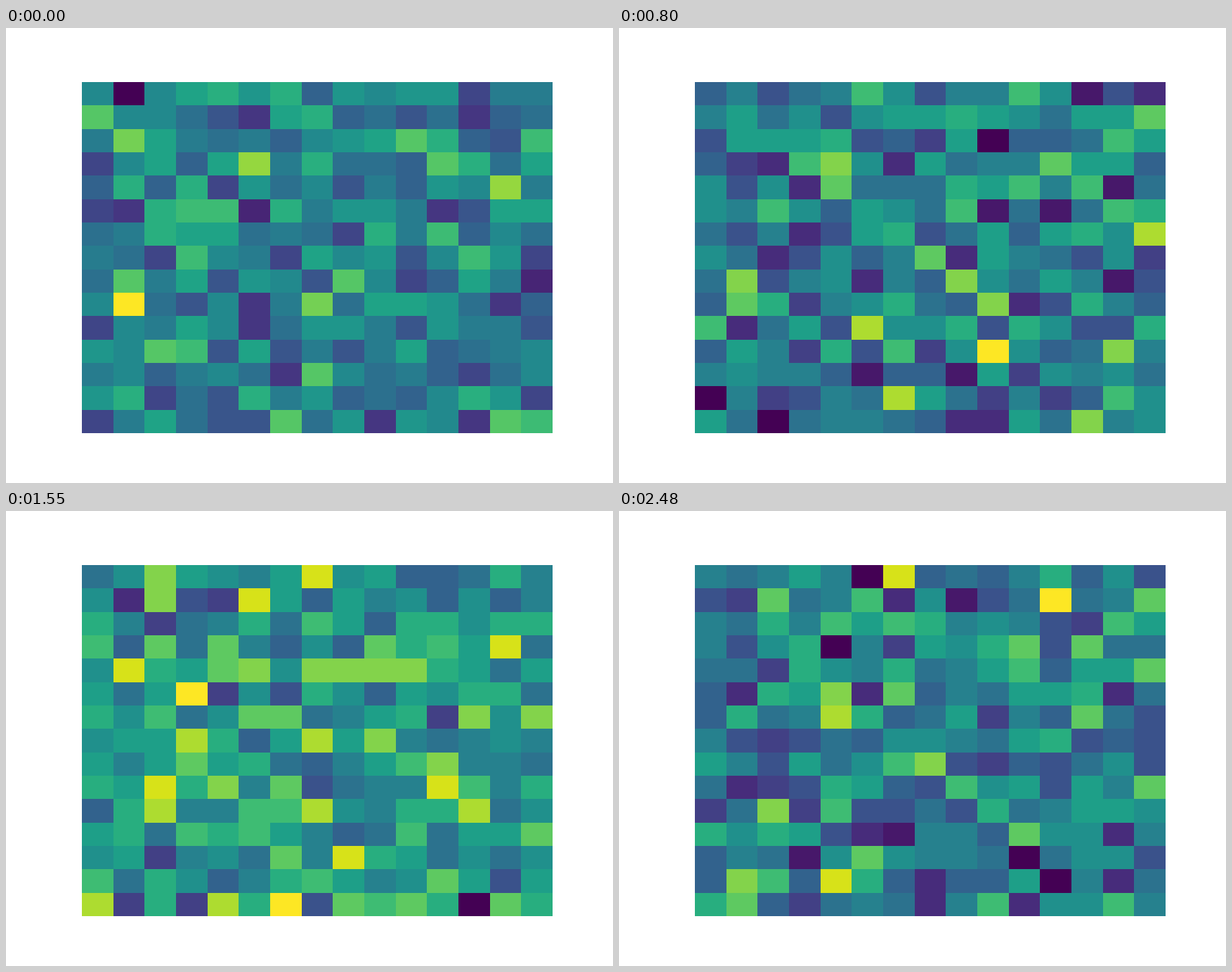
Recreate the animation shown at these times as a matplotlib script. Size 864x648 px, loop 2510 ms.

```python
import numpy as np
import matplotlib.pyplot as plt
from matplotlib.animation import FuncAnimation

SIZE = 15        # cells per side
MEAN = 10        # mean count per cell
STEPS = 100      # grids in one loop
TICK = 10        # ms
LOOP = 2510      # ms


def step_at(ms):
    """Steps last 30 and 20 ms in turn; the last one is held to the end."""
    pair, rest = divmod(ms, 50)
    return min(2 * pair + (rest >= 30), STEPS - 1)


# A fresh, independent grid of Poisson counts for every step
grids = np.random.default_rng(0).poisson(MEAN, (STEPS, SIZE, SIZE))

fig = plt.figure(figsize=(8.64, 6.48), dpi=100)
ax = fig.add_axes([0.125, 0.11, 0.775, 0.771])
ax.axis("off")
image = ax.imshow(grids[0], cmap="viridis", aspect="auto",
                  interpolation="nearest")


def update(tick):
    # Each grid spans the whole colour map, from its own lowest to highest
    image.set_data(grids[step_at(tick * TICK)])
    image.autoscale()
    return [image]


anim = FuncAnimation(fig, update, frames=LOOP // TICK, interval=TICK,
                     repeat=True, repeat_delay=0)
plt.show()
```
